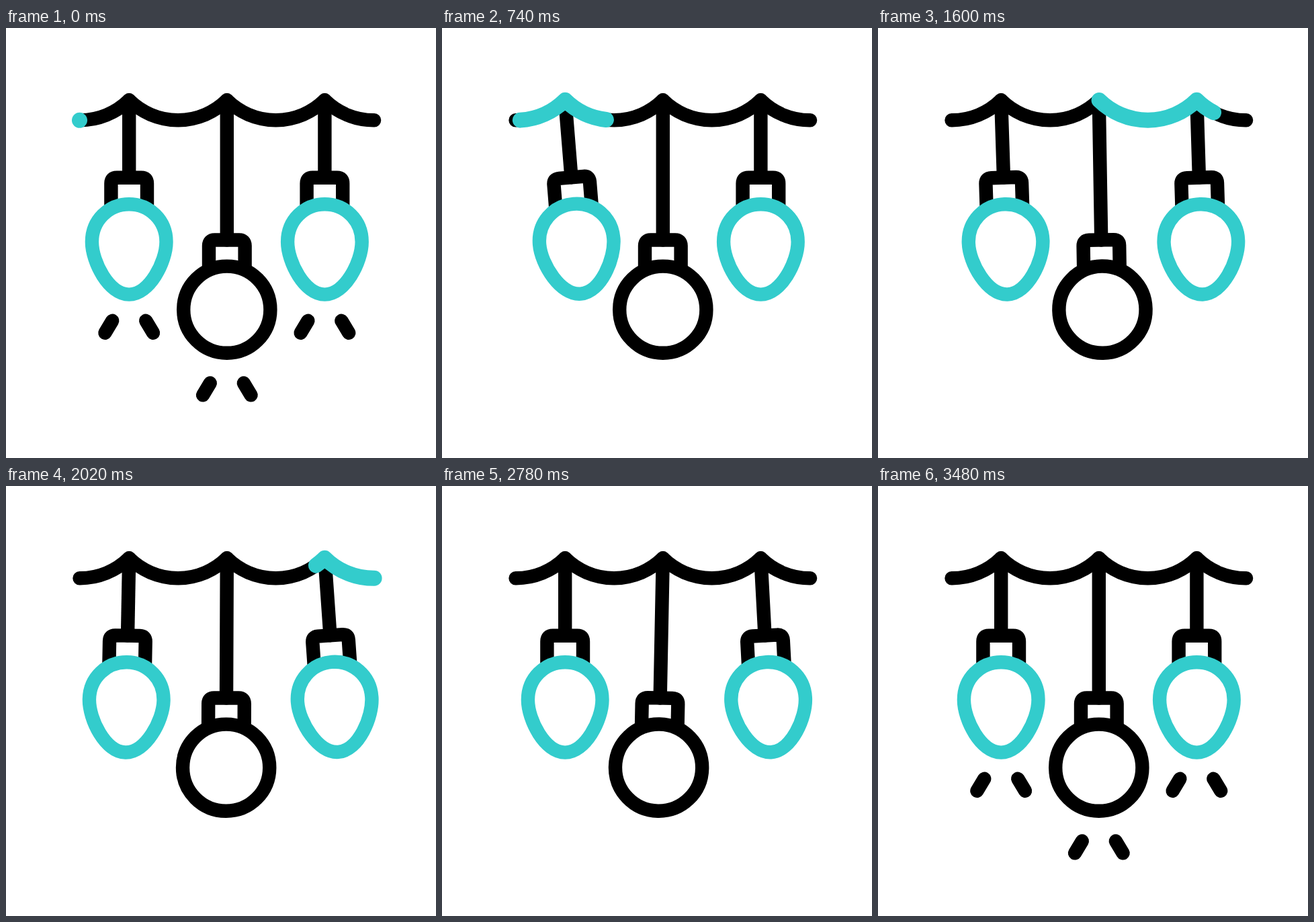
Write an HTML page that moves like this. It is 640 by 640 pixels and loops after 3.5 s.

```html
<!DOCTYPE html>
<html lang="en">
<head>
<meta charset="utf-8">
<title>String lights</title>
<style>
  html, body { margin: 0; width: 100%; height: 100%; overflow: hidden; background: #fff; }
  svg { display: block; width: 100vw; height: 100vh; }
  path, circle { fill: none; stroke: #000; stroke-width: 20.4; stroke-linecap: round; stroke-linejoin: round; }
  .teal { stroke: #33cccc; }
  .butt { stroke-linecap: butt; }
  #glow { stroke-width: 23; }
</style>
</head>
<body>
<svg viewBox="0 0 640 640">
  <defs>
    <path id="cap" class="butt" d="M-26.8 41.5V8.5Q-26.8 0 -18.3 0H18.3Q26.8 0 26.8 8.5V41.5"/>
    <path id="bulb" class="teal" d="M0 155C30.5 155 55.3 179 55.3 211C55.3 241 30 289.3 0 289.3S-55.3 241 -55.3 211C-55.3 179 -30.5 155 0 155Z"/>
  </defs>
  <g id="rays"></g>
  <g class="lamp">
    <path d="M0 0V208.2"/>
    <use href="#cap" y="208.2"/>
    <circle cy="311.9" r="64.6"/>
  </g>
  <g class="lamp">
    <path d="M0 0V115.4"/>
    <use href="#cap" y="115.4"/>
    <use href="#bulb"/>
  </g>
  <g class="lamp">
    <path d="M0 0V115.4"/>
    <use href="#cap" y="115.4"/>
    <use href="#bulb"/>
  </g>
  <path id="wire"/>
  <path id="glow" class="teal" pathLength="1"/>
</svg>
<script>
const LOOP = 3500;
const TOP = 107.3;
const SWING = [0, 8, -6, 4, -2, 0];
const STEP = 400;
const X = { left: 183.2, mid: 328.8, right: 474.4 };
const $ = id => document.getElementById(id);

const lampEls = document.querySelectorAll('.lamp');
const lamps = [
  { el: lampEls[0], x: X.mid, start: 1000 },
  { el: lampEls[1], x: X.left, start: 520 },
  { el: lampEls[2], x: X.right, start: 1480 }
];

const arc = (x, y) => `A103.6 103.6 0 0 0 ${x} ${y}`;
const wire = 'M109.5 137.3' + arc(X.left, TOP) + arc(X.mid, TOP) + arc(X.right, TOP) + arc(548.1, 137.3);
$('wire').setAttribute('d', wire);
$('glow').setAttribute('d', wire);

// Each lamp has a mirrored pair of rays below it.
const rays = [[X.left, 435.8], [X.mid, 528.4], [X.right, 435.8]].flatMap(([x, y]) =>
  [-1, 1].map(side => {
    const el = document.createElementNS('http://www.w3.org/2000/svg', 'path');
    $('rays').append(el);
    return { el, x: x + side * 25, y, side };
  }));

function ease(t, from, to) {
  const u = Math.min(1, Math.max(0, (t - from) / (to - from)));
  return u * u * (3 - 2 * u);
}

function angle(t) {
  const i = Math.floor(t / STEP);
  if (t <= 0 || i >= SWING.length - 1) return 0;
  return SWING[i] + (SWING[i + 1] - SWING[i]) * ease(t, i * STEP, (i + 1) * STEP);
}

function show(el, on) {
  el.setAttribute('visibility', on ? 'visible' : 'hidden');
}

function draw(t) {
  for (const { el, x, start } of lamps) {
    el.setAttribute('transform', `translate(${x} ${TOP}) rotate(${-angle(t - start)})`);
  }

  const head = ease(t, 0, 2000);
  const tail = ease(t, 600, 2600);
  const glow = $('glow');
  show(glow, head > tail);
  glow.setAttribute('stroke-dasharray', `${head - tail} 2`);
  glow.setAttribute('stroke-dashoffset', -tail);

  const grow = t < 1500 ? 1 - ease(t, 0, 500) : ease(t, 2800, 3300);
  for (const { el, x, y, side } of rays) {
    show(el, grow > 0);
    el.setAttribute('d', `M${x} ${y}l${side * 10.8 * grow} ${18 * grow}`);
  }
}

const begin = performance.now();
function tick() {
  draw((performance.now() - begin) % LOOP);
  requestAnimationFrame(tick);
}
draw(0);
requestAnimationFrame(tick);
</script>
</body>
</html>
```
